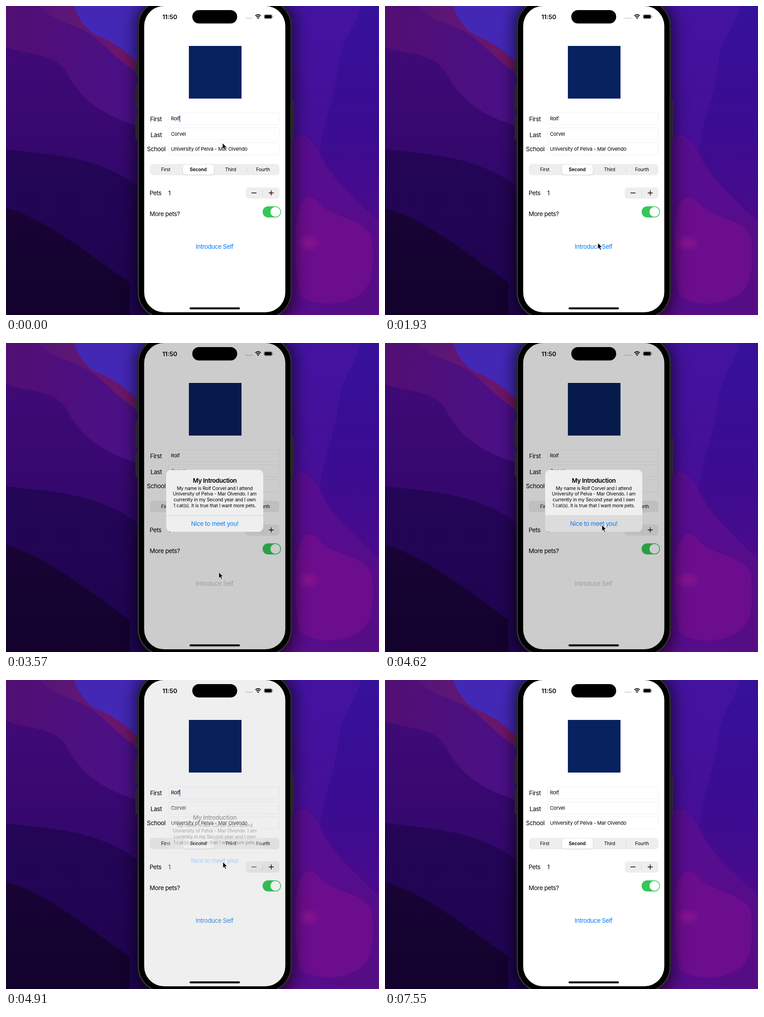
Animation of 822 by 681 pixels, one loop 7.57 s. Source, as an HTML page:

```html
<!DOCTYPE html>
<html lang="en">
<head>
<meta charset="utf-8">
<title>Introduction form</title>
<style>
  html, body { margin: 0; width: 100%; height: 100%; overflow: hidden; background: #3a0a6a; }
  svg { display: block; width: 100%; height: 100%; }
  text { font-family: Inter, "Liberation Sans", sans-serif; white-space: pre; }
  .body { font-size: 13.4px; letter-spacing: -.4px; }
  .field { font-size: 11px; letter-spacing: -.22px; }
  .small { font-size: 10.3px; letter-spacing: -.16px; }
  .bold { font-weight: 600; }
  .mid { text-anchor: middle; }
  .box { fill: #fff; stroke: #f0f0f0; }
  .tray { fill: #eeeeef; }
  .rule { stroke: #d6d6d8; }
</style>
</head>
<body>
<svg viewBox="0 0 822 681" preserveAspectRatio="none">
  <defs>
    <linearGradient id="band"><stop stop-color="#47157e"/><stop offset=".5" stop-color="#5f1674"/><stop offset="1" stop-color="#701666"/></linearGradient>
    <linearGradient id="plum"><stop stop-color="#520f73"/><stop offset="1" stop-color="#491089"/></linearGradient>
    <linearGradient id="violet" x2="0" y2="1"><stop stop-color="#400a76"/><stop offset="1" stop-color="#30076a"/></linearGradient>
    <linearGradient id="indigo" x2="0" y2="1"><stop stop-color="#240556"/><stop offset="1" stop-color="#1e0450"/></linearGradient>
    <linearGradient id="night" x2="0" y2="1"><stop stop-color="#180436"/><stop offset="1" stop-color="#12022c"/></linearGradient>
    <linearGradient id="right" x2="0" y2="1"><stop stop-color="#4313a0"/><stop offset=".4" stop-color="#450f98"/><stop offset=".65" stop-color="#530d91"/><stop offset="1" stop-color="#5c0a85"/></linearGradient>
    <linearGradient id="deep" x2="0" y2="1"><stop stop-color="#36119a"/><stop offset=".6" stop-color="#3b0c91"/><stop offset="1" stop-color="#4a0b8c"/></linearGradient>
    <linearGradient id="slope" x2=".8" y2="1"><stop stop-color="#58108f"/><stop offset=".5" stop-color="#560d8e"/><stop offset="1" stop-color="#540a84"/></linearGradient>
    <radialGradient id="spot"><stop stop-color="#8a158f"/><stop offset="1" stop-color="#8a158f" stop-opacity="0"/></radialGradient>
    <filter id="soft" x="-30%" width="160%"><feGaussianBlur stdDeviation="17"/></filter>
    <filter id="blend"><feGaussianBlur stdDeviation="5"/></filter>
    <filter id="lift" x="-10%" y="-20%" width="120%" height="150%"><feDropShadow dx="0" dy="1" stdDeviation="1.5" flood-opacity=".16"/></filter>
  </defs>

  <!-- wallpaper -->
  <path fill="#4328b6" d="M0 0H460V681H0Z"/>
  <path fill="url(#band)" d="M0 0H150C160 28 178 56 204 66C238 80 266 100 300 134V330H0Z"/>
  <path fill="url(#plum)" d="M0 0H74C98 34 150 38 182 60C220 84 250 128 300 152V330H0Z"/>
  <path fill="url(#violet)" d="M0 90C40 108 98 100 130 140C158 192 190 235 300 268H340V430H0Z"/>
  <path fill="url(#indigo)" d="M0 315C80 328 205 325 300 405H340V681H0Z"/>
  <path fill="url(#night)" d="M0 445C90 470 180 545 272 610V681H0Z"/>
  <path fill="url(#right)" d="M460 0H822V681H460Z"/>
  <path fill="url(#deep)" d="M822 0H782C772 45 742 70 735 120C726 200 700 250 690 330C720 400 780 450 822 470Z"/>
  <path fill="url(#slope)" d="M630 300C655 262 680 300 705 350C740 405 790 440 822 480V681H630Z" filter="url(#blend)"/>
  <path fill="#6c0d8d" d="M640 470C650 412 672 412 692 436C720 468 790 468 806 508C812 570 808 612 785 632C750 660 690 664 650 640C636 600 636 520 640 470Z" filter="url(#blend)"/>
  <ellipse cx="666" cy="522" rx="30" ry="20" fill="url(#spot)"/>
  <rect x="284" y="-20" width="352" height="720" rx="60" opacity=".58" filter="url(#soft)"/>

  <!-- phone -->
  <path fill="#242427" stroke="#3c3c40" stroke-width=".6" d="M286 122h6v28h-6zM286 174h6v52h-6zM286 241h6v53h-6zM628 209h6v85h-6z"/>
  <rect x="290" y="-14" width="340" height="703" rx="58" fill="#161618" stroke="#29292b"/>
  <rect x="292" y="-12" width="336" height="699" rx="56" fill="#000" stroke="#515155" stroke-width="1.2"/>
  <rect x="304.5" y="0" width="311" height="675" rx="44" fill="#fff"/>

  <!-- form -->
  <rect x="403" y="88" width="116" height="116" fill="#07225f"/>
  <g class="body">
    <text x="317.5" y="253.5">First</text>
    <text x="318.5" y="289">Last</text>
    <text x="310.5" y="320">School</text>
    <text x="316.5" y="417">Pets</text>
    <text x="357.5" y="417">1</text>
    <text x="316.5" y="462.5">More pets?</text>
    <text id="intro" class="mid" x="459.5" y="535.3">Introduce Self</text>
  </g>
  <g class="box">
    <rect x="358.5" y="235.5" width="244" height="26" rx="4"/>
    <rect x="358.5" y="268.5" width="244" height="26.5" rx="4"/>
    <rect x="358.5" y="301.5" width="244" height="26.5" rx="4"/>
  </g>
  <g class="field">
    <text x="363.5" y="252">Rolf</text>
    <text x="363.5" y="285.5">Corvel</text>
    <text x="363.5" y="318.7">University of Pelva - Mar Olvendo</text>
  </g>
  <rect id="caret" x="382.5" y="241" width="1.5" height="14.5" fill="#2f55d4"/>

  <rect class="tray" x="317" y="348" width="285.5" height="25" rx="7"/>
  <rect x="390" y="349.5" width="68" height="22" rx="5.5" fill="#fff" filter="url(#lift)"/>
  <path class="rule" d="M531 355v11"/>
  <g class="small mid">
    <text x="352" y="364.3">First</text>
    <text x="423.5" y="364.3" class="bold">Second</text>
    <text x="495" y="364.3">Third</text>
    <text x="566.5" y="364.3">Fourth</text>
  </g>

  <rect class="tray" x="528.5" y="399.7" width="74" height="24.7" rx="6.5"/>
  <path class="rule" d="M565.5 405v14"/>
  <path stroke="#000" stroke-width="1.4" d="M541 412h11M579 412h11M584.5 406.5v11"/>
  <rect x="565.5" y="441.5" width="40.5" height="24.5" rx="12.25" fill="#34c759"/>
  <circle cx="593.7" cy="453.7" r="10.8" fill="#fff"/>

  <rect id="dim" x="304.5" y="0" width="311" height="675" rx="44"/>

  <!-- status bar -->
  <rect x="410.5" y="9" width="99" height="29.5" rx="14.7"/>
  <text x="361" y="28.5" class="mid bold" font-size="13.4">11:50</text>
  <path d="M529.5 27h13" stroke="#000" stroke-opacity=".22" stroke-width="2.8" stroke-linecap="round" stroke-dasharray="0 4"/>
  <path d="M549.5 21.5Q555.5 16.5 561.5 21.5M551.7 24.2Q555.5 20.8 559.3 24.2" fill="none" stroke="#000" stroke-width="1.9"/>
  <path d="M553.3 26.2Q555.5 24.2 557.7 26.2L555.5 28.6Z"/>
  <rect x="568.5" y="18.5" width="18.5" height="10" rx="3.2" fill="none" stroke="#000" stroke-opacity=".4" stroke-width=".8"/>
  <rect x="569.7" y="19.7" width="16" height="7.6" rx="2"/>
  <path d="M588.3 22v3" stroke="#000" stroke-opacity=".45"/>
  <rect x="404.5" y="664.3" width="111" height="4.2" rx="2.1"/>

  <!-- alert -->
  <g id="alert" class="mid">
    <rect x="353" y="279.5" width="214" height="136.5" rx="11" fill="#eeefee"/>
    <path id="press" fill="#dcdcdc" d="M353 381H567V405Q567 416 556 416H364Q353 416 353 405Z"/>
    <path d="M353 380.5h214" stroke="#cfcfd0"/>
    <text x="460" y="307.7" class="body bold">My Introduction</text>
    <g class="small">
      <text x="460" y="323.8">My name is Rolf Corvel and I attend</text>
      <text x="460" y="336.4">University of Pelva - Mar Olvendo. I am</text>
      <text x="460" y="349">currently in my Second year and I own</text>
      <text x="460" y="361.6">1 cat(s). It is true that I want more pets.</text>
    </g>
    <text x="460" y="403.3" class="body" fill="#087cfb">Nice to meet you!</text>
  </g>

  <path id="cursor" fill="#000" stroke="#fff" stroke-width=".9" d="M0 0V13.5L3 10.7L5.2 15.8L7.5 14.8L5.3 9.8H9.5Z"/>
</svg>
<script>
const LOOP = 7570, STEP = 148;
const OPEN = 1930, TAP = 4440, CLOSE = 4650, HIDE = 6830;
// time, x, y of the pointer tip
const path = [
  [150, 477, 302], [1190, 470, 519], [1340, 469, 522], [2220, 469, 522], [2820, 469, 505],
  [3560, 469, 505], [4300, 478, 401], [5200, 478, 401], [5780, 511, 159]
];
const $ = id => document.getElementById(id);
const set = (id, name, value) => $(id).setAttribute(name, value);
const clamp = v => Math.min(1, Math.max(0, v));
const mix = (a, b, p) => a + (b - a) * p;
const ease = p => p * p * (3 - 2 * p);

function pointer(t) {
  const i = path.findIndex(p => p[0] > t);
  if (i < 0) return path[path.length - 1].slice(1);
  if (i === 0) return path[0].slice(1);
  const [a, b] = [path[i - 1], path[i]];
  const p = ease((t - a[0]) / (b[0] - a[0]));
  return [mix(a[1], b[1], p), mix(a[2], b[2], p)];
}

function caret(t) {
  if (t > 1640 && t < CLOSE) return 0;
  const phase = (t < OPEN ? t : t - 4620) % 1000;
  return phase < 500 ? 1 : Math.max(clamp((620 - phase) / 120), clamp((phase - 900) / 100));
}

function alertLevel(t) {
  if (t < OPEN) return 0;
  if (t < CLOSE) return 1 - Math.exp((OPEN - t) / 80);
  return t < 5650 ? Math.exp((CLOSE - t) / 200) : 0;
}

function draw(t) {
  const level = alertLevel(t);
  const scale = t < CLOSE ? 1 + .18 * (1 - level) : 1;
  set('dim', 'opacity', .2 * level);
  set('alert', 'opacity', level);
  set('alert', 'transform', `translate(460 348) scale(${scale}) translate(-460 -348)`);
  set('press', 'opacity', t >= TAP && t < CLOSE ? 1 : 0);
  set('intro', 'fill', `rgb(${mix(0, 196, level)},${mix(122, 196, level)},${mix(255, 198, level)})`);
  set('caret', 'opacity', caret(t));
  set('cursor', 'transform', `translate(${pointer(t)})`);
  set('cursor', 'opacity', t < HIDE ? 1 : 0);
}

function tick() {
  const t = performance.now() % LOOP;
  draw(Math.floor(t / STEP) * STEP);
  requestAnimationFrame(tick);
}
tick();
</script>
</body>
</html>
```
